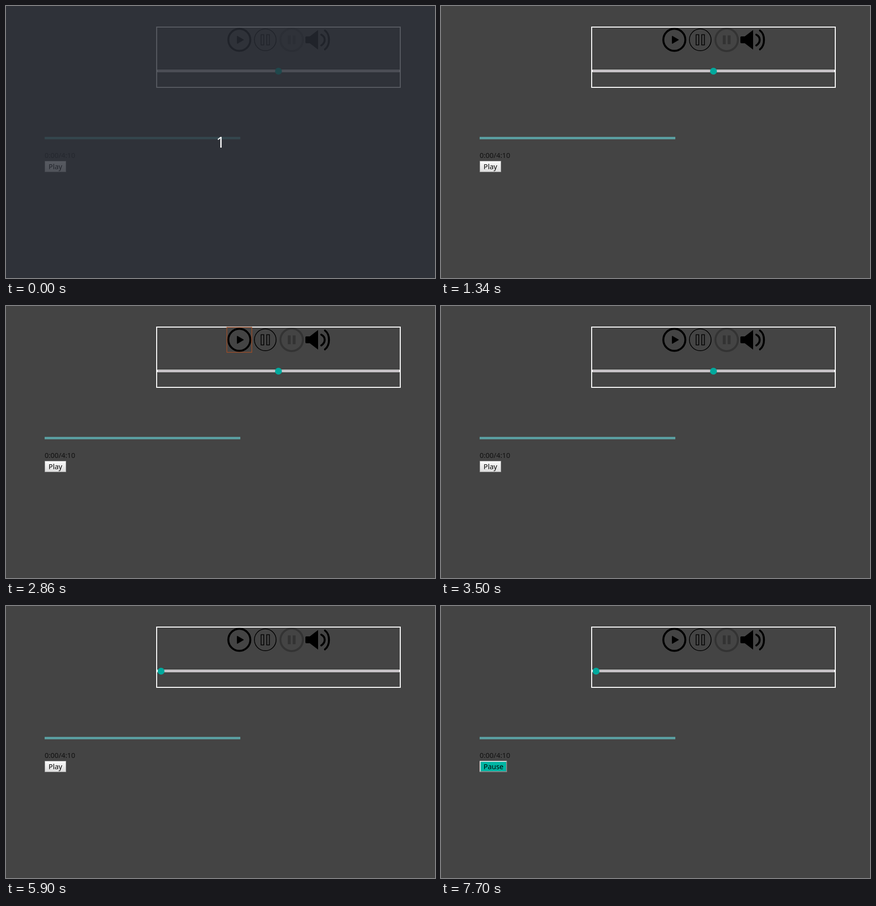
Recreate the animation shown at these times as an HTML page. Size 877 px wide and 555 px high, loop 8000 ms.

```html
<!DOCTYPE html>
<html lang="en">
<head>
<meta charset="utf-8">
<title>Audio player</title>
<style>
html, body { margin: 0; width: 100%; height: 100%; overflow: hidden; background: #444; }
svg { display: block; width: 877px; height: 555px; font: 14.4px "Noto Sans", "Open Sans", sans-serif; }
.line { fill: none; stroke: #000; }
</style>
</head>
<body>
<svg viewBox="0 0 877 555">
  <defs>
    <linearGradient id="face" x2="0" y2="1">
      <stop stop-color="#fafafa"/><stop offset="1" stop-color="#dcdcdc"/>
    </linearGradient>
  </defs>
  <rect width="877" height="555" fill="#444"/>

  <rect x="308" y="43" width="498" height="123" fill="none" stroke="#fff" stroke-width="2"/>
  <g id="playIcon">
    <circle class="line" cx="477" cy="69" r="22.5" stroke-width="4"/>
    <path d="M473 62V76L485 69Z" stroke="#000" stroke-width="2" stroke-linejoin="round"/>
  </g>
  <g class="line" stroke-width="1.6">
    <circle cx="530" cy="69" r="22.2"/>
    <path d="M521.5 58.5h5.5v21h-5.5zM533 58.5h5.5v21h-5.5z"/>
  </g>
  <g fill="#333">
    <circle cx="584" cy="69" r="23" fill="none" stroke="#333" stroke-width="4"/>
    <path d="M576 60h6v18h-6zM586 60h6v18h-6z"/>
  </g>
  <path d="M614 62H621L638 49V89L621 76H614Q612 76 612 74V64Q612 62 614 62Z"/>
  <path class="line" stroke-width="4" stroke-linecap="round"
    d="M644.5 58.5Q651.5 62 651.5 69T644.5 80.5M652 50C663 58 663 80 652 88.500"/>
  <rect id="ring" x="451.5" y="43.500" width="51" height="51" fill="none" stroke="#a34d25" stroke-width="1.3"/>

  <rect x="309" y="130" width="496" height="5" fill="#fff"/>
  <rect x="310" y="131" width="494" height="3" fill="#b9b3b9"/>
  <circle id="thumb" cy="133" r="7" fill="#00a99d"/>

  <rect x="79" y="267" width="400" height="5" fill="#5a9ea0"/>
  <text x="79" y="310" fill="#111">0:00/4:10</text>

  <g id="play">
    <rect id="face-box" x="79.5" y="316.5" width="43" height="22" fill="url(#face)"/>
    <text x="87" y="333">Play</text>
  </g>
  <g id="pause">
    <rect x="79" y="316" width="56" height="23" fill="#00b5a3"/>
    <path d="M79 339V316H135L133 318H81V337Z" fill="#ddd"/>
    <path d="M135 316V339H79L81 337H133V318Z" fill="#858585"/>
    <text x="87" y="333">Pause</text>
  </g>

  <g id="countdown">
    <rect width="877" height="555" fill="#292d36" fill-opacity=".78"/>
    <text x="438.500" y="288.500" font-size="31" fill="#fff" text-anchor="middle">1</text>
  </g>
</svg>
<script>
const $ = id => document.getElementById(id);
const show = (id, on) => $(id).setAttribute("visibility", on ? "visible" : "hidden");

function draw(now) {
  const t = now % 8000;
  show("countdown", t < 500);
  show("ring", t >= 1900 && t < 3500);
  $("thumb").setAttribute("cx", t < 5900 ? 557 : 317);
  $("face-box").setAttribute("stroke", t < 7100 ? "#999" : "#6a6a6a");
  show("play", t < 7700);
  show("pause", t >= 7700);
}

const start = performance.now();
function tick() {
  draw(performance.now() - start);
  requestAnimationFrame(tick);
}
tick();
</script>
</body>
</html>
```
